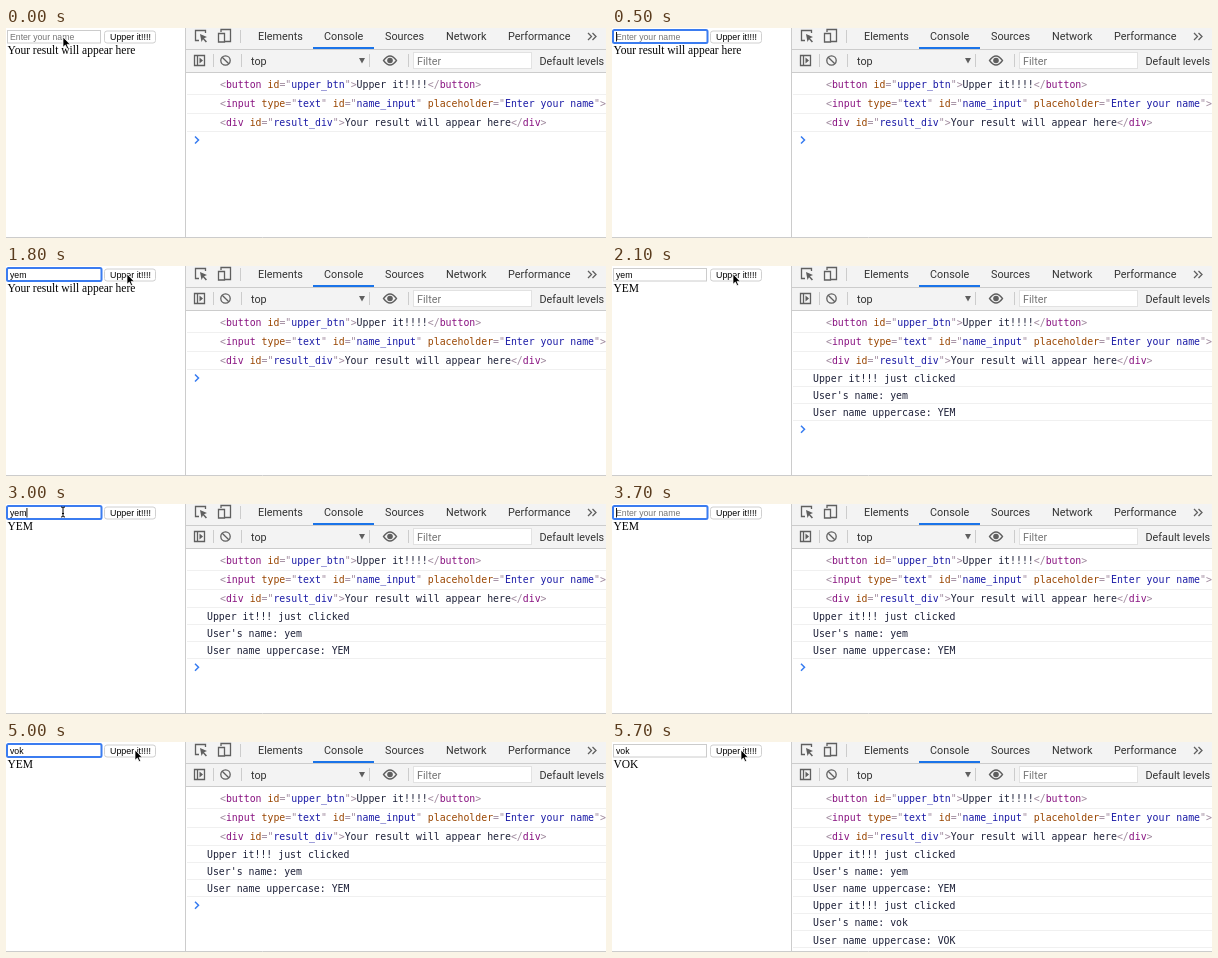
Animation of 600 by 210 pixels, one loop 5800 ms. Source, as an HTML page:

```html
<!DOCTYPE html>
<html lang="en">
<head>
<meta charset="utf-8">
<title>Upper it</title>
<style>
  html, body { margin: 0; width: 100%; height: 100%; overflow: hidden; background: #fff; }
  svg { display: block; }
  text { white-space: pre; }
  .ui { font: 10.8px Roboto, Arial, sans-serif; fill: #333; }
  .form { font: 8.7px "Liberation Sans", Arial, sans-serif; fill: #000; }
  .result { font: 11.5px "Liberation Serif", Times, serif; }
  .mono { font: 9.87px "DejaVu Sans Mono", Menlo, monospace; fill: #1d2038; }
  .bracket { fill: #a08a9e; }
  .tag { fill: #881280; }
  .attr { fill: #994500; }
  .value { fill: #1a1aa6; }
  .icon { fill: none; stroke: #5f5f5f; stroke-width: 1.3; }
  .solid { fill: #5f5f5f; stroke: none; }
  .rule { stroke: #ccc; }
  .row { stroke: #f0f0f0; }
</style>
</head>
<body>
<svg width="600" height="210" viewBox="0 0 600 210">
  <!-- page -->
  <rect id="field" fill="#fff"/>
  <text id="typed" class="form" x="4" y="12.3"></text>
  <path id="caret" stroke="#000" stroke-width=".9"/>
  <rect x="98.500" y="3" width="51" height="12" rx="2.500" fill="#fff" stroke="#d0d0d0"/>
  <text class="form" x="104" y="12.3" style="font-size:8.9px">Upper it!!!!</text>
  <text id="result" class="result" x="1.5" y="26"></text>

  <!-- developer tools -->
  <rect x="180" width="420" height="44" fill="#f3f3f3"/>
  <path class="rule" d="M180 21.5H600M180 44.5H600M234.5 2V15M207.5 26V39M235.5 26V39M363.5 26V39M402.5 26V39"/>
  <path d="M307 20H368" stroke="#1a73e8" stroke-width="2"/>
  <g class="ui">
    <text x="252" y="12">Elements</text>
    <text x="318" y="12">Console</text>
    <text x="379" y="12">Sources</text>
    <text x="440" y="12">Network</text>
    <text x="502" y="12">Performance</text>
    <text x="245" y="36.5">top</text>
    <text x="533.5" y="36.5">Default levels</text>
  </g>
  <rect x="407.5" y="24.5" width="118" height="16" fill="#fff" stroke="#e2e2e2"/>
  <text class="ui" x="411" y="36.5" style="fill:#757575">Filter</text>
  <g class="icon">
    <path d="M199.5 5V2.5H189.5V12.5H193"/>
    <path class="solid" d="M194 6L201 9 198 10.2 201 13.5 199.8 14.5 197 11.3 195.500 14Z"/>
    <path d="M215 4V1.5H224.5V13.5H219M212.5 5.5H218.5V14H212.5Z"/>
    <path d="M188.5 27.5H198.5V37.5H188.5ZM191.5 27.5V37.5"/>
    <path class="solid" d="M193.500 29.5L197 32.5 193.500 35.5Z"/>
    <circle cx="219.5" cy="32.5" r="4.7"/>
    <path d="M216.2 29.2L222.8 35.8"/>
    <path d="M377.5 32.5Q384 23.5 390.5 32.5Q384 41.5 377.5 32.5Z"/>
    <circle class="solid" cx="384" cy="32.5" r="2.8"/>
    <path d="M582 5L585.5 8.5 582 12M586.5 5L590 8.5 586.5 12"/>
  </g>
  <path class="icon solid" d="M353 30H359L356 35.5Z"/>
  <path class="row" d="M181 66.5H600M181 85.5H600M181 103.5H600"/>
  <g id="markup" class="mono"></g>
  <g id="logs" class="mono"></g>
  <path id="prompt" d="M189 108.5L192.500 112 189 115.5" fill="none" stroke="#367cf1" stroke-width="1.5"/>
  <path class="rule" d="M179.5 0V210M0 209.5H600"/>

  <path id="arrow" d="M0 0V10.2L2.4 8 4 11.6 5.6 10.9 4 7.4H7.2Z" fill="#000" stroke="#fff" stroke-width=".7"/>
  <path id="beam" d="M-2 -5Q0 -5 0 -4Q0 -5 2 -5M0 -4V4M-2 5Q0 5 0 4Q0 5 2 5M-1 1.5H1" fill="none" stroke="#000"/>
</svg>
<script>
const LOOP = 5800, STEP = 100;
const $ = id => document.getElementById(id);
const show = (el, on) => el.setAttribute('visibility', on ? 'visible' : 'hidden');
const set = (el, attrs) => { for (const k in attrs) el.setAttribute(k, attrs[k]); };
const span = (cls, s) => `<tspan class="${cls}">${s}</tspan>`;

function tag(name, attrs, body) {
  const list = Object.entries(attrs).map(([k, v]) =>
    ' ' + span('attr', k) + span('bracket', '="') + span('value', v) + span('bracket', '"')).join('');
  const open = span('bracket', '&lt;') + span('tag', name) + list + span('bracket', '&gt;');
  return body ? open + body + span('bracket', '&lt;/') + span('tag', name) + span('bracket', '&gt;') : open;
}

$('markup').innerHTML = [
  tag('button', { id: 'upper_btn' }, 'Upper it!!!!'),
  tag('input', { type: 'text', id: 'name_input', placeholder: 'Enter your name' }),
  tag('div', { id: 'result_div' }, 'Your result will appear here')
].map((s, i) => `<text x="214" y="${60 + 19 * i}">${s}</text>`).join('');

// Each edit restarts the caret's blink.
const edits = [
  [300, ''], [600, 'y'], [800, 'ye'], [1000, 'yem'], [2700, 'yem'], [3300, 'ye'],
  [3400, 'y'], [3500, ''], [3800, 'v'], [4100, 'vo'], [4500, 'vok']
];
const clicks = [[1900, 'yem'], [5200, 'vok']];
const mouse = [
  [0, 57, 9], [1300, 57, 9], [1700, 121, 8], [2400, 121, 8],
  [2800, 57, 8], [4500, 57, 8], [4900, 129, 8], [LOOP, 129, 8]
];
const within = (t, a, b) => t >= a && t < b;

function mouseAt(t) {
  const i = mouse.findIndex(m => m[0] > t);
  const [t0, x0, y0] = mouse[i - 1], [t1, x1, y1] = mouse[i];
  const p = (t - t0) / (t1 - t0), e = p * p * (3 - 2 * p);
  return [x0 + (x1 - x0) * e, y0 + (y1 - y0) * e];
}

function drawField(t) {
  const focused = within(t, 300, 1900) || within(t, 2700, 5200);
  const [since, text] = edits.filter(e => e[0] <= t).pop() || [0, ''];
  set($('field'), focused
    ? { x: 1, y: 2, width: 94.5, height: 13, rx: 1.5, stroke: '#3b7cf0', 'stroke-width': 2 }
    : { x: 1.5, y: 2.5, width: 93, height: 12.5, rx: 0, stroke: '#ccc', 'stroke-width': 1 });
  $('typed').textContent = text || 'Enter your name';
  $('typed').style.fill = text ? '#000' : '#757575';
  const x = 4.5 + (text ? $('typed').getComputedTextLength() : 0);
  set($('caret'), { d: `M${x} 4V13.5` });
  show($('caret'), focused && Math.floor((t - since) / 500) % 2 === 0);
}

function drawConsole(t) {
  const done = clicks.filter(c => c[0] <= t).map(c => c[1]);
  const lines = done.flatMap(n =>
    ['Upper it!!! just clicked', `User's name: ${n}`, `User name uppercase: ${n.toUpperCase()}`]);
  $('result').textContent = done.length ? done.pop().toUpperCase() : 'Your result will appear here';
  $('logs').innerHTML = lines.map((s, i) => {
    const y = 17.1 * i, edge = Math.floor(121 + y) - .5;
    return `<text x="201" y="${116 + y}">${s}</text><path class="row" d="M181 ${edge}H600"/>`;
  }).join('');
  set($('prompt'), { transform: `translate(0 ${17.1 * lines.length})` });
}

function drawMouse(t) {
  const [x, y] = mouseAt(t);
  const seen = !within(t, 500, 1300) && !within(t, 3300, 4500);
  const beam = t >= 200 && x < 96;
  for (const id of ['arrow', 'beam']) {
    set($(id), { transform: `translate(${x} ${y})` });
    show($(id), seen && beam === (id === 'beam'));
  }
}

function frame() {
  const t = Math.floor(performance.now() % LOOP / STEP) * STEP;
  drawField(t);
  drawConsole(t);
  drawMouse(t);
  requestAnimationFrame(frame);
}
frame();
</script>
</body>
</html>
```
